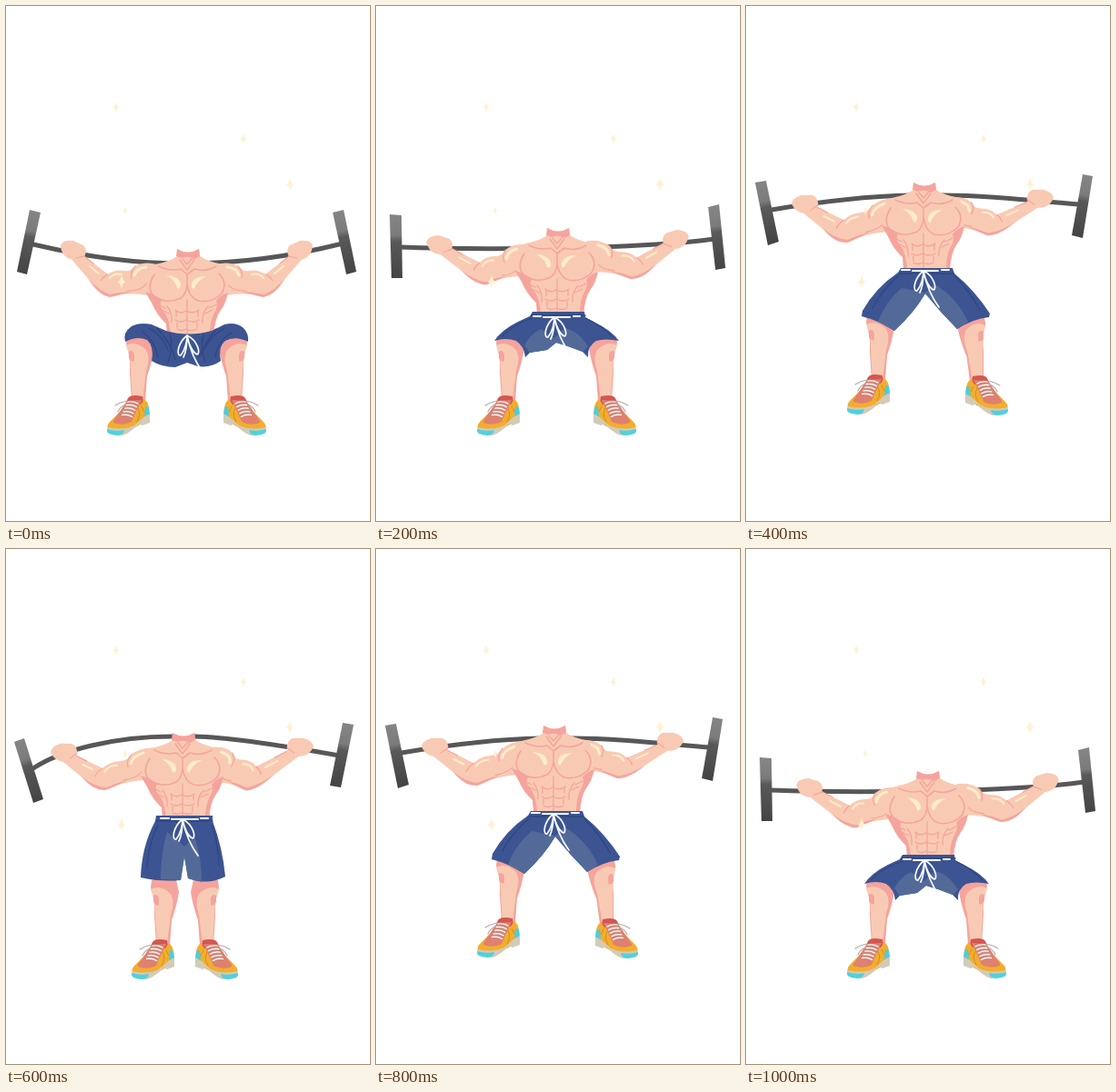
Write an HTML page with a canvas that moves like this. It is 400 px wide and 566 px high and loops after 1200 ms.

```html
<!DOCTYPE html>
<html lang="en">
<head>
<meta charset="utf-8">
<title>Squat</title>
<style>
html, body { margin: 0; width: 100%; height: 100%; overflow: hidden; background: #fff; }
canvas { display: block; width: 400px; height: 566px; }
</style>
</head>
<body>
<canvas id="stage"></canvas>
<script>
const canvas = document.getElementById('stage');
const ctx = canvas.getContext('2d');
const ratio = window.devicePixelRatio || 1;
canvas.width = 400 * ratio;
canvas.height = 566 * ratio;

const SKIN = '#f9cab3', PINK = '#f5a49d', GLOW = '#feeccb';
const BLUE = '#3c5492', LIGHT = '#536a99', DARK = '#304680';
const AXIS = 397; // mirrored x = AXIS - x
const STEP = 200;
const ORDER = [0, 1, 2, 3, 2, 1];

const fill = (d, color) => {
  ctx.fillStyle = color;
  ctx.fill(new Path2D(d));
};
const line = (d, color, width = 1.2) => {
  ctx.strokeStyle = color;
  ctx.lineWidth = width;
  ctx.stroke(new Path2D(d));
};
const at = (x, y, draw, flip) => {
  ctx.save();
  ctx.translate(x, y);
  if (flip) {
    ctx.translate(AXIS, 0);
    ctx.scale(-1, 1);
  }
  draw();
  ctx.restore();
};

// Arms hold hand, elbow and shoulder points; plates hold four corners;
// legs hold an offset and a lean.
const poses = [
  {
    body: [0, 0], legs: [[0, 0, 0], [0, 0, 0]], bow: [199, 362], tilt: 0,
    bar: 'M30 262C90 276 140 283 199 283S310 276 370 261',
    plates: [[26, 224, 38, 227, 23, 295, 12, 292], [359, 227, 371, 224, 385, 292, 374, 295]],
    arms: [[74, 268, 110, 318, 160, 284], [323, 268, 287, 318, 237, 284]],
    shorts: 'M131 369Q128 359 138 352Q147 347 160 350L176 357Q200 364 226 357L240 350Q253 347 261 354Q267 360 266 369Q252 362 241 368Q233 374 236 390Q225 398 211 396L199 392L186 397Q171 397 160 390Q163 374 155 367Q144 362 131 369Z',
    light: '',
    folds: 'M157 354Q172 362 178 378M150 358Q164 368 167 386M180 360Q184 376 178 392M166 354Q180 368 186 388M240 354Q225 362 218 378M248 359Q232 368 230 386M217 361Q213 376 219 392M231 355Q220 368 212 386'
  },
  {
    body: [0, -23], legs: [[0, 0, 0], [0, 0, 0]], bow: [196, 342], tilt: -0.15,
    bar: 'M27 265C80 267 140 267 199 266S320 263 372 256',
    plates: [[15, 229, 28, 230, 29, 299, 17, 299], [365, 221, 377, 218, 384, 288, 373, 290]],
    arms: [[70, 262, 117, 305, 160, 263], [329, 256, 285, 299, 238, 259]],
    shorts: 'M172 336H229L230 342L241 348Q258 356 267 368Q252 365 242 368Q232 374 233 386L227 380L211 374L198 370L188 378L169 381L164 386Q163 374 154 368Q143 364 130 368Q138 356 156 347L169 341Z',
    light: 'M181 355Q170 360 163 373L169 381L188 378L198 370L211 374L227 380L233 374Q221 356 207 354L196 365Z',
    folds: 'M172 343Q151 350 138 363M230 343Q248 351 260 364M171 340H230',
    belt: 'M173 341H181M184 342H213M217 341H224'
  },
  {
    body: [-4, -73], legs: [[0, -23, 0], [2, -22, 0.06]], bow: [195, 291], tilt: -0.4,
    bar: 'M28 224C75 216 130 209 182 208M207 208C250 207 310 213 366 218',
    plates: [[10, 194, 22, 192, 36, 259, 24, 263], [370, 185, 381, 187, 370, 255, 358, 252]],
    arms: [[65, 217, 107, 259, 158, 213], [323, 211, 270, 251, 230, 211]],
    shorts: 'M170 288H227L229 294Q251 312 268 338L267 342Q249 344 232 355Q214 337 197 316Q184 338 163 357Q147 346 127 341L128 335Q143 309 167 293Z',
    light: 'M171 310Q153 325 145 347L163 357Q184 338 197 316Q214 337 232 355L244 347Q230 318 207 306L197 315Z',
    folds: 'M168 296Q147 315 139 332M229 296Q247 315 257 334M168 294H228',
    belt: 'M171 290H180M183 291H211M215 290H223'
  },
  {
    body: [-5, -65], legs: [[27, 1, 0], [-31, 1, 0]], bow: [194, 297], tilt: -0.4,
    bar: 'M30 241C60 221 120 206 182 206M207 206C250 207 310 217 366 227',
    plates: [[9, 212, 20, 208, 41, 275, 30, 279], [370, 191, 382, 193, 368, 262, 356, 260]],
    arms: [[64, 223, 105, 264, 157, 220], [323, 217, 268, 264, 232, 219]],
    shorts: 'M165 293H227V299Q238 328 241 360Q222 370 200 362L196 338L192 364Q168 366 148 361Q149 327 164 299Z',
    light: 'M177 311Q170 335 170 363L192 364L196 338L200 362L215 366Q215 337 207 316L196 327Z',
    folds: 'M167 303Q156 326 155 350M226 303Q234 326 234 348M165 299H227',
    belt: 'M170 296H179M182 297H211M214 296H222'
  }
];

const stars = [[121, 111, 6], [261, 146, 6], [312, 196, 8], [131, 225, 5], [127, 303, 8]];

function plate([ax, ay, bx, by, cx, cy, dx, dy]) {
  const shade = ctx.createLinearGradient((ax + bx) / 2, (ay + by) / 2, (cx + dx) / 2, (cy + dy) / 2);
  shade.addColorStop(0, '#858585');
  shade.addColorStop(0.32, '#7b7b7b');
  shade.addColorStop(0.42, '#595959');
  shade.addColorStop(1, '#444');
  fill(`M${ax} ${ay}L${bx} ${by}L${cx} ${cy}L${dx} ${dy}Z`, shade);
}

// Maps the resting arm onto a hand, elbow and shoulder.
function arm([hx, hy, ex, ey, sx, sy]) {
  const det = 36 * 16 - 50 * 86;
  const solve = (e, s) => [(e * 16 - s * 50) / det, (s * 36 - e * 86) / det];
  const [a, c] = solve(ex - hx, sx - hx);
  const [b, d] = solve(ey - hy, sy - hy);
  ctx.save();
  ctx.transform(a, b, c, d, hx - a * 74 - c * 268, hy - b * 74 - d * 268);
  fill('M166 284Q152 280 142 286Q138 292 130 291Q120 289 112 295Q102 287 86 275L81 266L69 275L94 304Q104 317 114 319Q136 314 156 318L172 300Z', SKIN);
  fill('M90 299Q102 313 114 317Q126 314 137 314Q124 318 114 320Q103 318 94 305Z', PINK);
  line('M112 295Q106 298 104 302M142 286Q136 292 138 299M133 313Q149 314 156 303M86 275L96 283', PINK);
  line('M141 296Q143 288 154 287', GLOW, 3);
  line('M114 299Q119 293 127 295M92 286L102 294', GLOW, 2);
  ctx.restore();
}

function fist(x, y, tilt, side) {
  ctx.save();
  ctx.translate(x, y);
  ctx.scale(side, 1);
  ctx.rotate(tilt);
  fill('M-14 -5Q-12 -11 0 -10L11 -5Q16 0 12 8L0 11Q-13 9 -14 -5Z', SKIN);
  line('M12 7L3 9', PINK);
  ctx.restore();
}

function torso() {
  fill('M188 267L193 270Q200 273 207 270L212 267L213 275Q222 281 238 284L245 300L243 317Q241 328 236 334Q229 344 228 363H178L176 349Q166 340 160 326L154 316L156 293L164 284Q180 281 188 275Z', SKIN);
  fill('M188 267Q200 274 212 267L213 275L207 278Q200 274 193 277L187 275Z', PINK);
  fill('M153 314Q164 317 171 323Q167 330 175 338Q180 346 181 362H177L176 349Q166 340 160 326Z', PINK);
  fill('M244 315Q235 318 231 324Q234 330 228 339Q224 348 224 362H228Q229 344 236 334Q241 328 244 315Z', PINK);
  line('M191 279L199 290L207 279M194 278L199 284L205 277', PINK, 1.4);
  line('M168 286Q180 292 192 289L199 295L207 289Q219 293 231 286', PINK, 1.6);
  line('M163 295Q153 311 164 320Q178 328 192 321Q198 317 199 306V296M199 306Q201 320 211 324Q226 327 237 316Q244 304 234 294', PINK, 1.6);
  fill('M176 296Q191 297 192 306Q192 312 188 310Q186 301 176 296Z', GLOW);
  fill('M220 297Q206 297 204 306Q204 312 207 310Q210 302 220 297Z', GLOW);
  line('M199 323V360M186 334Q191 339 198 335Q206 339 212 334M186 345Q192 349 198 345Q206 349 212 345M188 355Q193 358 198 355Q205 358 210 355', PINK, 1.3);
  line('M187 335V341M211 335V341M188 348V353M210 348V353M167 328L175 332M171 334L179 338M177 330Q183 337 182 348M231 328L223 332M227 334L219 338M222 330Q215 338 216 348', PINK, 1.3);
}

function shoe() {
  fill('M134 431Q137 426 150 429L151 436L145 441L131 438Z', '#d45651');
  fill('M133 434L127 444L115 456Q110 461 112 466L130 468Q146 463 158 451L157 441Q156 435 152 432L148 438Z', '#f3ad2d');
  fill('M133 434L149 433L141 450L138 457Q128 462 118 458V456Z', '#df8070');
  fill('M153 440L157 441L158 449L152 451Z', '#4ccddb');
  fill('M112 463Q128 467 141 461L151 452L158 448V458L150 461L146 459Q137 469 128 472L112 469Z', '#d2cbb8');
  fill('M111 465Q121 468 130 466Q129 472 122 472Q111 471 111 467Z', '#52d0dc');
  line('M145 442Q149 449 144 457M149 440L152 446', '#d68e1f', 1);
  line('M133 434Q126 435 120 439M134 437Q126 439 123 446', '#b9aca7', 1.2);
  for (let i = 0; i < 5; i++) {
    const x = 134 - i * 1.6, y = 435 + i * 3.6;
    const lace = `M${x} ${y}Q${x + 6} ${y - 1} ${x + 11} ${y + 2}`;
    line(lace, '#b7a096', 2);
    line(lace, '#fff', 1.2);
  }
}

function leg(lean) {
  ctx.save();
  ctx.transform(1, 0, -lean, 1, lean * -434, 0);
  ctx.translate(lean * 868, 0);
  fill('M133 363L132 371Q137 385 136 402L138 434H153L155 407Q161 390 163 376L159 358Z', PINK);
  fill('M132 373Q143 367 154 378Q159 387 154 401L150 434H139L137 402Q137 386 132 373Z', SKIN);
  fill('M135 380Q139 377 141 383L141 390Q137 392 135 386Z', PINK);
  ctx.restore();
  shoe();
}

function shorts(p) {
  fill(p.shorts, BLUE);
  if (p.light) fill(p.light, LIGHT);
  line(p.folds, DARK, 1.3);
  if (p.belt) line(p.belt, '#fff', 2);
  at(...p.bow, () => line('M0 0C-11 9 -12 23 -7 22C-2 16 0 6 0 0C12 6 15 20 11 21C6 19 1 8 0 0Q0 16 -4 24M0 0Q5 24 17 40', '#f7f9fd', 1.7));
}

function star([x, y, r]) {
  const w = r * 0.6, k = r * 0.12;
  at(x, y, () => fill(`M0 ${-r}Q${k} ${-k} ${w} 0Q${k} ${k} 0 ${r}Q${-k} ${k} ${-w} 0Q${-k} ${-k} 0 ${-r}Z`, '#fef2d2'));
}

function draw(now) {
  const p = poses[ORDER[Math.floor(now / STEP) % ORDER.length]];
  ctx.setTransform(ratio, 0, 0, ratio, 0, 0);
  ctx.fillStyle = '#fff';
  ctx.fillRect(0, 0, 400, 566);
  ctx.lineCap = ctx.lineJoin = 'round';
  line(p.bar, '#575757', 5);
  p.plates.forEach(plate);
  p.arms.forEach(arm);
  p.arms.forEach(([x, y], i) => fist(x, y, p.tilt, i ? -1 : 1));
  at(...p.body, torso);
  p.legs.forEach(([x, y, lean], i) => at(x, y, () => leg(lean), i === 1));
  shorts(p);
  stars.forEach(star);
}

const start = performance.now();
function tick() {
  draw(performance.now() - start);
  requestAnimationFrame(tick);
}
tick();
</script>
</body>
</html>
```
